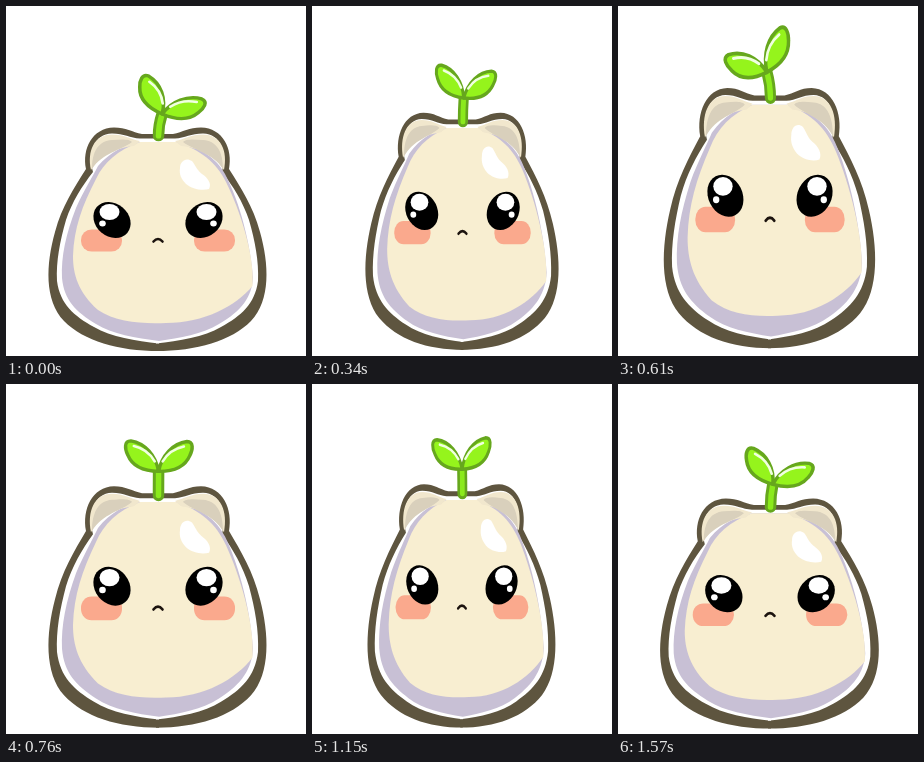
An HTML page with a canvas that plays this animation: 300x350 px, repeating every 1.6 s.

```html
<!DOCTYPE html>
<html>
<head>
<meta charset="utf-8">
<style>
  html, body { margin: 0; width: 100%; height: 100%; overflow: hidden; background: #fff; }
  canvas { display: block; }
</style>
</head>
<body>
<canvas id="stage" width="300" height="350"></canvas>
<script>
const ctx = document.getElementById('stage').getContext('2d');
const PERIOD = 25.5; // steps per bounce, two bounces per loop
const AXIS = 151.5;

// [step, value] keys of one bounce
const topKeys = [[0, 124], [2.5, 125.5], [5, 123], [10.5, 103], [13, 88],
                 [15.5, 84], [18.5, 86], [23, 105], [24.5, 117]];
const widthKeys = [[0, 108.5], [5, 103.5], [10.5, 93.5], [11.8, 93],
                   [13, 93.5], [18.5, 106], [23, 108.5]];

// Left halves, drawn mirrored
const outline = new Path2D('M153 345C112 345 78 335 58 315C38 294 40 258 49 226C56 200 68 182 80 163C76 143 86 122 108 121.5C120 121.5 126 126 136 128L153 128Z');
const rim = new Path2D('M153 337.5C130 335 105 331 88 321C68 310 54 298 51 275C50 255 54 235 60 214C66 196 76 180 87 166C82 146 88 128 106 127.5C118 127.5 124 132 134 132.5L153 132.5Z');
const earRim = new Path2D('M85 164C81 145 88 128.5 106 128.5C118 128.5 124 133 134 135L128 140C104 143 94 150 85 164Z');
const ear = new Path2D('M86 163C86 146 92 135 106 134C116 133 124 133 126 136C116 144 96 147 86 163Z');

const shade = new Path2D('M153 335C130 332 106 328 90 318C70 306 58 294 56 272C55 250 60 228 70 202C78 184 86 172 92 160C104 146 120 138 134 136L170 136C196 142 210 152 219 168C234 196 245 240 247 272C246 290 236 305 213 318C197 328 173 332 153 335Z');
const skin = new Path2D('M134 136C112 144 98 156 90 173C76 200 68 222 67 250C67 268 72 286 92 304C110 316 135 318 160 317C198 317 230 300 246.5 280C249 250 234 204 220 176C210 156 195 144 170 136Z');
const shine = new Path2D('M174 162C174 155 180 151 186 155C190 160 190 163 196 168C202 172 206 178 203 183C196 185 186 183 180 178C175 173 173 168 174 162Z');
const mouth = new Path2D('M147.5 235.5Q152 230.5 156.5 235.5');
const blush = new Path2D();
blush.roundRect(75, 223.5, 41, 22, 10.5);

const leaf = new Path2D('M0 0C-3 -16 -14 -28 -28 -30C-35 -30 -34 -22 -31 -16C-26 -4 -14 0 0 0Z');
const leafShine = new Path2D('M-4 -10Q-11 -22 -25 -25');

// Smooth periodic curve through the keys
function curve(keys, s) {
  const n = keys.length;
  const key = i => {
    const [x, y] = keys[(i + n) % n];
    return [x + Math.floor(i / n) * PERIOD, y];
  };
  const slope = i => {
    const a = key(i - 1), b = key(i + 1);
    return (b[1] - a[1]) / (b[0] - a[0]);
  };
  let i = n - 1;
  while (keys[i][0] > s) i--;
  const [x0, y0] = key(i), [x1, y1] = key(i + 1);
  const d = x1 - x0, u = (s - x0) / d, v = 1 - u;
  return y0 * v * v * (1 + 2 * u) + y1 * u * u * (3 - 2 * u)
       + d * u * v * (slope(i) * v - slope(i + 1) * u);
}

function fill(path, color) {
  ctx.fillStyle = color;
  ctx.fill(path);
}

function stroke(path, color, width) {
  ctx.strokeStyle = color;
  ctx.lineWidth = width;
  ctx.stroke(path);
}

function oval(x, y, rx, ry, tilt, color) {
  const path = new Path2D();
  path.ellipse(x, y, rx, ry, tilt, 0, 7);
  fill(path, color);
}

function mirrored(axis, draw) {
  draw();
  ctx.save();
  ctx.translate(2 * axis, 0);
  ctx.scale(-1, 1);
  draw();
  ctx.restore();
}

function drawSprout(angle) {
  ctx.save();
  ctx.translate(152.5, 130);
  ctx.scale(1, 0.93);
  const bend = angle * 0.35, x = 24 * Math.sin(bend), y = -24 * Math.cos(bend);
  const stem = new Path2D(`M0 0Q0 -12 ${x} ${y}`);
  stroke(stem, '#66a71d', 11.5);
  stroke(stem, '#8bea1c', 5.5);
  ctx.translate(x, y);
  ctx.rotate(angle);
  const size = 1 + Math.abs(angle) * 0.1;
  ctx.scale(size, size);
  mirrored(0, () => {
    fill(leaf, '#95f41c');
    stroke(leaf, '#66a71d', 3.4);
    stroke(leafShine, '#f0ffe0', 2.6);
  });
  ctx.restore();
}

function drawBody() {
  mirrored(AXIS, () => fill(outline, '#5e553f'));
  mirrored(AXIS, () => fill(rim, '#fff'));
  fill(shade, '#c8c0d5');
  fill(skin, '#f8eed1');
  mirrored(AXIS, () => {
    fill(earRim, '#f1e7cd');
    fill(ear, '#d9d0bc');
  });
  fill(shine, '#fff');
}

function drawFace() {
  mirrored(152, () => {
    fill(blush, '#faa98d');
    oval(106, 214, 20, 16.5, 0.7, '#000');
    oval(103.5, 206, 10, 8, 0, '#fff');
    oval(96.5, 217.5, 3.3, 3, 0, '#fff');
  });
  stroke(mouth, '#1c130e', 2.6);
}

function render(now) {
  const t = now % 1600;
  const step = (t < 100 ? 0 : 1 + Math.floor((t - 100) / 30)) % PERIOD;
  const top = curve(topKeys, step), half = curve(widthKeys, step);
  const bottom = 345 - (124 - top) * 0.07;
  const center = Math.min(AXIS, 149.5 + (half - 93.5) / 5);

  ctx.setTransform(1, 0, 0, 1, 0, 0);
  ctx.fillStyle = '#fff';
  ctx.fillRect(0, 0, 300, 350);
  ctx.lineCap = ctx.lineJoin = 'round';
  ctx.translate(center, bottom);
  ctx.scale(half / 108.5, (bottom - top) / 221);
  ctx.translate(-AXIS, -345);
  drawBody();
  drawSprout((top - 104.5) * 0.0222);
  drawFace();
  requestAnimationFrame(render);
}
render(0);
</script>
</body>
</html>
```
